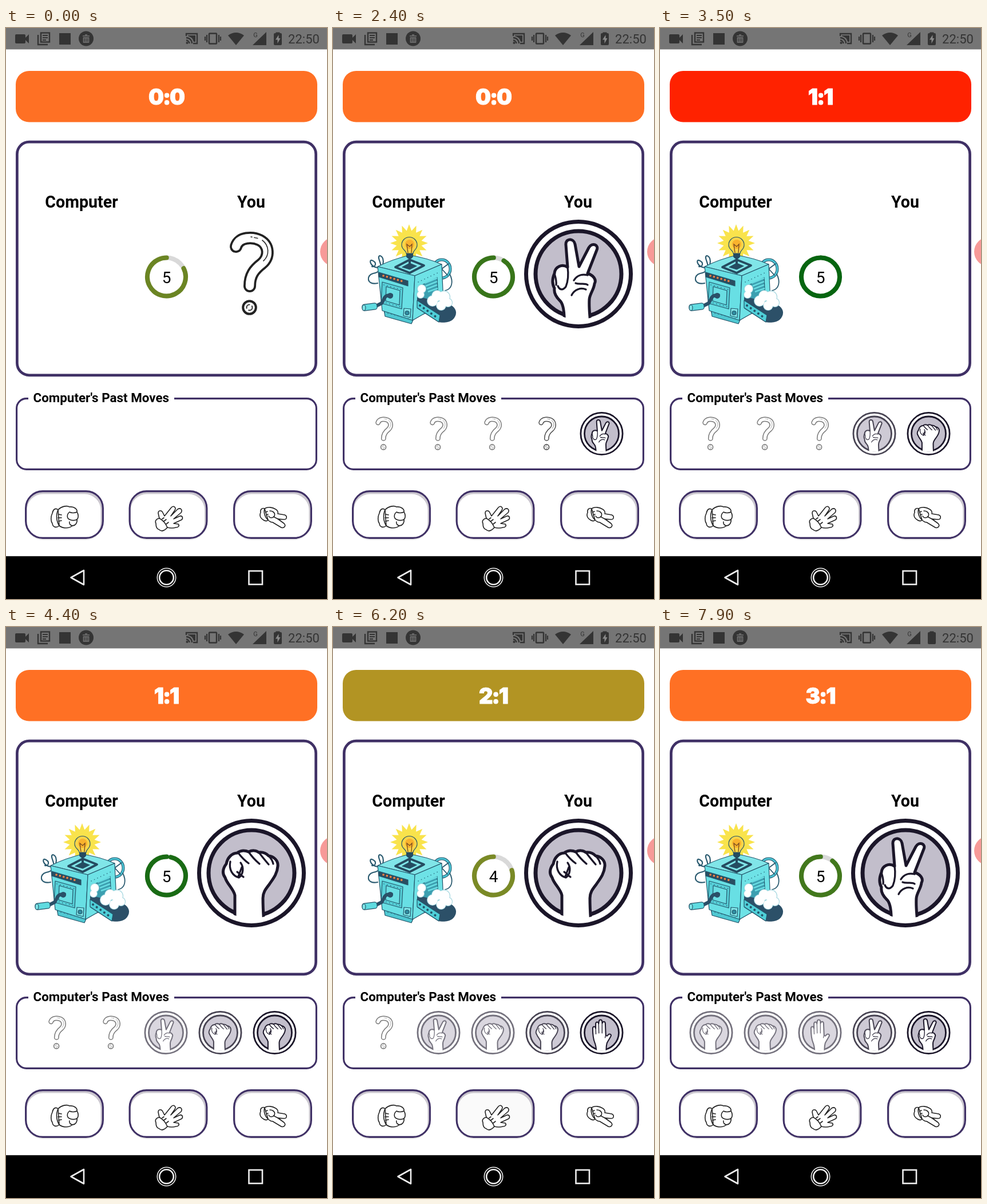
Animation of 561x998 px, one loop 8000 ms. Source, as an HTML page:

```html
<!DOCTYPE html>
<html lang="en">
<head>
<meta charset="utf-8">
<title>Hand game</title>
<style>
  html, body { margin: 0; width: 100%; height: 100%; overflow: hidden; background: #fff; }
  svg { display: block; width: 561px; height: 998px; }
  text { font-family: Roboto, Arial, sans-serif; text-anchor: middle; }
  .bold { font-weight: 700; }
  .line { fill: none; }
  #score {
    font: 900 38px Inter, sans-serif; letter-spacing: -2px; font-feature-settings: "calt" 0;
    fill: #fff; stroke: #fff; stroke-width: 1;
  }
  .glove { fill: #fff; stroke: #222; stroke-width: 1.6; stroke-linejoin: round; stroke-linecap: round; }
  .hand { fill: #fff; stroke: #1b1629; stroke-width: 5; stroke-linejoin: round; stroke-linecap: round; }
  .thin { fill: none; stroke-width: 3.3; }
  .ink { stroke: #24566b; stroke-width: 1.2; stroke-linejoin: round; }
</style>
</head>
<body>
<svg viewBox="0 0 561 998">
  <defs>
    <g id="medal">
      <circle r="91.5" fill="#fff" stroke="#1b1629" stroke-width="7"/>
      <circle r="75" fill="#c2becb" stroke="#1b1629" stroke-width="7"/>
    </g>
    <clipPath id="inner"><circle r="79.5"/></clipPath>

    <g id="q" transform="translate(-429 -430)" fill="none" stroke-linecap="round">
      <path id="hook" d="M402 382C407 364 432 365 444 371C460 380 461 400 447 412C434 422 426 432 426 451" stroke="#222" stroke-width="22"/>
      <path d="M402 382C407 364 432 365 444 371C460 380 461 400 447 412C434 422 426 432 426 451" stroke="#fff" stroke-width="14.5"/>
      <path d="M448 371C460 380 461 397 450 407" stroke="#333" stroke-width="1.7"/>
      <path d="M428 365L442 368" stroke="#333" stroke-width="1.7" stroke-dasharray="2 4 6 4"/>
      <circle cx="425.5" cy="488.5" r="11.3" fill="#fff" stroke="#222" stroke-width="4"/>
      <circle cx="425.5" cy="488.5" r="5" stroke="#333" stroke-width="2" stroke-dasharray="9 5"/>
    </g>

    <g id="s">
      <use href="#medal"/>
      <g clip-path="url(#inner)"><g class="hand" transform="translate(-429 -430)">
        <path d="M404 520C405 494 402 481 396 476C388 468 386 462 387 455C382 446 384 436 387 429C388 417 400 412 410 418L407 379C406 367 421 367 423 378L430 417L447 384C453 374 465 379 461 388L445 429C455 432 461 440 457 447C456 457 449 464 448 474C447 490 449 500 450 520"/>
        <path class="thin" d="M410 418C412 432 411 442 407 452C402 459 396 458 393 451M387 429C389 436 391 442 390 449M421 441C427 431 437 430 445 432M424 446C431 449 440 445 445 449M417 467C422 457 433 453 442 457"/>
      </g></g>
    </g>

    <g id="r">
      <use href="#medal"/>
      <g clip-path="url(#inner)"><g class="hand" transform="translate(-429 -430)">
        <path d="M400 520L400 469C398 458 386 449 383 438C377 430 379 422 385 414C387 403 395 395 404 395C410 390 418 390 424 393C430 390 437 390 442 394C450 393 456 397 459 400C468 401 476 408 475 418C474 432 466 441 460 450C453 459 449 464 449 474C449 494 450 504 451 520"/>
        <path class="thin" d="M392 410C389 424 396 435 407 438C415 432 416 420 410 412M404 428L415 437M412 420L406 436M406 395C412 403 417 408 424 413M424 393C430 402 436 408 443 414M442 394C448 402 453 408 459 415M459 400C464 405 466 409 467 414"/>
      </g></g>
    </g>

    <g id="p">
      <use href="#medal"/>
      <g clip-path="url(#inner)"><g class="hand" transform="translate(-429 -430)">
        <path d="M406 520C406 496 404 486 399 474C392 458 390 440 390 412C390 402 402 401 403 411L403 392C403 381 415 381 416 391L417 382C418 371 430 371 431 382L432 389C433 379 445 380 445 391L447 440C450 445 453 446 456 441C461 433 474 436 469 446C463 458 456 466 452 476C448 490 448 500 450 520"/>
        <path class="thin" d="M403 411L404 436M416 391L417 432M431 385L431 432M447 440L444 452"/>
      </g></g>
    </g>

    <g id="button">
      <rect x="1" y="4" width="136" height="83" rx="31" opacity=".09"/>
      <rect x="1" y="1" width="136" height="83" rx="30" fill="#cbc7cf"/>
      <rect x="3.5" y="6.5" width="129" height="78" rx="28" fill="#fff"/>
    </g>
    <rect id="edge" x="1.6" y="1.6" width="134.8" height="81.8" rx="29.600" fill="none" stroke="#3f3065" stroke-width="3.120"/>
  </defs>

  <rect width="561" height="998" fill="#fff"/>

  <!-- status bar -->
  <rect width="561" height="37.400" fill="#757575"/>
  <g fill="#343434" stroke="#343434" stroke-width="0">
    <path d="M18 11H32Q34 11 34 13V17L40 11V27L34 21V25Q34 27 32 27H18Q16 27 16 25V13Q16 11 18 11Z"/>
    <path d="M56 12V29H73" class="line" stroke-width="2.4"/>
    <rect x="61" y="8.5" width="15" height="16" class="line" stroke-width="2.4"/>
    <path d="M64 13H73M64 17H73M64 21H70" stroke-width="2"/>
    <rect x="93" y="9" width="20" height="20"/>
    <circle cx="140" cy="18.5" r="13"/>
    <path d="M134 14H146M138 12H142M135.5 17V25H144.5V17ZM138.5 17V25M141.5 17V25" class="line" style="stroke:#757575" stroke-width="1.6"/>
    <path d="M315 14V10H334V27H327M315 17A10 10 0 0 1 325 27M315 21.5A6 6 0 0 1 320.5 27" class="line" stroke-width="2.3"/>
    <path d="M318 13H331V24H328Q326 16 318 14Z"/>
    <circle cx="316.5" cy="26" r="2"/>
    <rect x="355" y="9.5" width="13" height="18" rx="1" class="line" stroke-width="2.5"/>
    <path d="M351 12V25M348 15V22M372 12V25M375 15V22" stroke-width="2.2"/>
    <path d="M388 13Q402 3 416 13L402 30Z"/>
    <path d="M455 7V30H431Z"/>
    <text x="436" y="16" font-size="11">G</text>
    <path d="M471.5 9V7.5H478.5V9H480Q482 9 482 11V28Q482 30 480 30H470Q468 30 468 28V11Q468 9 470 9Z"/>
    <path id="bolt" d="M476.5 12L471 20.5H474.5V27L479.5 18H476.5Z" fill="#8a8a8a"/>
    <text x="520.5" y="27" font-size="22">22:50</text>
  </g>

  <!-- score -->
  <rect id="banner" x="17" y="75" width="527" height="89.5" rx="23.4"/>
  <text id="score" x="280" y="134"></text>

  <!-- arena -->
  <rect x="19.4" y="199.2" width="522.2" height="407.6" rx="21" fill="none" stroke="#3f3065" stroke-width="4.7"/>
  <text class="bold" x="132" y="313.5" font-size="28.6">Computer</text>
  <text class="bold" x="428.5" y="313.5" font-size="28.6">You</text>

  <g id="machine">
    <path id="burst" fill="#f9e34c"/>
    <g fill="none" stroke="#2b5b70" stroke-width="2.2" stroke-linecap="round">
      <path d="M78 446C58 450 58 432 70 429C90 426 92 400 82 398C74 400 92 420 78 419C64 417 63 404 68 406C78 410 74 418 68 417"/>
      <ellipse cx="190" cy="421" rx="15" ry="16" stroke="#1e5468" stroke-width="5"/>
      <ellipse cx="190" cy="421" rx="15" ry="16" stroke="#4cc5d6" stroke-width="3"/>
      <path d="M178 430L202 412M181 411L200 432M204 430C211 444 208 456 196 459" stroke-width="1.8"/>
    </g>
    <g class="ink">
      <path d="M88 488L91 504L137 517L142 506L190 488V478Z" fill="#4fc8d2"/>
      <path d="M78 417Q104 404 134 397Q165 402 190 413L143 433Z" fill="#80e5e8"/>
      <path d="M78 417L143 433L139 511L86 494Z" fill="#68dfe4"/>
      <path d="M143 433L190 413L193 480L139 511Z" fill="#6ee2e6"/>
      <path d="M150 452L182 436L184 476L149 487Z" fill="#3c9fb0"/>
      <path d="M160 446L182 437M162 451L182 443M164 456L182 449M166 461L183 455" stroke="#68dce2" stroke-width="2.5"/>
      <path d="M109 418L134 405L159 415L134 428Z" fill="#80e5e8" stroke="#254b60" stroke-width="3.8"/>
      <path d="M121 418L134 411L146 416L134 422Z" fill="#254b60"/>
      <path d="M80 427L131 442V451L80 435Z" fill="#294d61"/>
      <path d="M86 444L122 454L120 491L84 481Z" fill="#57d0d8"/>
      <path d="M93 452L117 459L116 484L92 477Z" fill="#6adee3"/>
      <path d="M124 490L136 491L135 506L123 503Z" fill="#80e5e8"/>
      <circle cx="129.5" cy="498" r="3.5" fill="#2f8ca0"/>
    </g>
    <path d="M88 433L126 444" stroke="#f58242" stroke-width="3.6" stroke-linecap="round" stroke-dasharray=".1 6.5"/>
    <path d="M89 449L119 457M87 479L117 487M90 497L136 509M149 444L185 427" stroke="#2b6c80" stroke-width="1.6" stroke-linecap="round" stroke-dasharray=".1 6"/>
    <path d="M147 469L200 482C217 487 219 501 209 510C201 516 190 515 184 514L147 490Z" fill="#2c5068"/>
    <path class="ink" d="M147 476L187 502L185 514L147 489Z" fill="#4fcfd8"/>
    <path d="M152 485L183 507" stroke="#24566b" stroke-width="4" stroke-linecap="round" stroke-dasharray=".1 8"/>
    <g id="steam"></g>
    <path d="M102 467C88 466 90 475 85 481L75 486" fill="none" stroke="#2a5068" stroke-width="6" stroke-linecap="round"/>
    <circle cx="100" cy="468" r="5" fill="#2a5068"/>
    <rect class="ink" x="51" y="482" width="26" height="11" rx="4" fill="#5fdbe0" transform="rotate(-7 64 487)"/>
    <ellipse class="ink" cx="54" cy="489" rx="3" ry="5" fill="#80e5e8"/>
    <path d="M134 399V419" stroke="#254b60" stroke-width="4"/>
    <path class="ink" d="M128 394C128 388 120 388 120 379A13.5 13.5 0 0 1 147 379C147 388 140 388 140 394Z" fill="#fcd548"/>
    <circle cx="134" cy="378" r="8" fill="#f9b22d"/>
    <path d="M131 393L129 378L134 382L138 378L137 393" fill="none" stroke="#754821" stroke-width="1.3"/>
    <path d="M128 394H140V400L137 403H131L128 400Z" fill="#254b60"/>
  </g>

  <circle cx="280.5" cy="435" r="33.5" fill="none" stroke="#d9d9d9" stroke-width="8"/>
  <circle id="ring" cx="280.5" cy="435" r="33.5" fill="none" stroke-width="8" stroke-linecap="round"/>
  <text id="count" x="280.5" y="446" font-size="28"></text>
  <use id="pick" transform="translate(429 430)"/>
  <circle cx="574.5" cy="391" r="25.5" fill="#f79a98"/>

  <!-- history -->
  <rect x="18.6" y="647.6" width="523.8" height="123.800" rx="17" fill="none" stroke="#3f3065" stroke-width="3.120"/>
  <rect x="39" y="640" width="255" height="14" fill="#fff"/>
  <text class="bold" x="166.3" y="654" font-size="22.4">Computer's Past Moves</text>
  <g id="past"></g>

  <!-- buttons -->
  <g id="buttons"></g>
  <g class="glove">
    <path d="M91 842C97 836 106 834 111 837C119 836 125 841 124 846C127 850 127 856 124 859C125 865 121 870 116 870C110 875 100 875 93 870Z"/>
    <path d="M91 842C86 838 82 842 81 848C78 854 78 862 81 866C82 873 88 874 93 870C88 862 87 851 91 842Z"/>
    <path class="line" d="M124 846C120 848 114 848 111 846C106 850 106 857 111 859C115 861 120 861 124 859M116 870C112 869 110 866 111 863M92 850L97 851M91 856H97M92 862L97 861"/>
    <path d="M268 857L266 848C266 843 272 842 274 847L277 853L289 838C293 834 298 838 295 843L288 853L300 841C305 838 309 842 306 847L293 858L304 853C309 852 310 858 306 860L293 866L301 867C304 870 301 873 297 873C290 875 286 874 282 873Z"/>
    <path d="M268 857C262 858 260 862 262 866C262 872 264 876 268 877C272 881 278 878 282 873C279 866 274 860 268 857Z"/>
    <path class="line" d="M273 858L276 856M276 862L280 859M280 867L284 864"/>
    <path d="M452 840C458 836 466 838 471 841C475 843 476 847 475 849L487 851C492 853 491 859 486 859L475 858L486 866C490 870 486 875 481 873L466 864C462 864 460 862 458 860Z"/>
    <path d="M452 840C447 838 444 842 445 847C442 853 446 858 450 860C453 862 456 862 458 860C452 855 450 846 452 840Z"/>
    <path class="line" d="M461 844C467 844 471 848 469 853C466 857 461 857 459 853M475 858L469 855M454 846L457 845M455 851L458 850"/>
  </g>

  <!-- navigation -->
  <rect y="923.200" width="561" height="75" fill="#000"/>
  <g fill="none" stroke="#eee" stroke-width="2.600">
    <path d="M113.500 960.500L136 948V973Z" stroke-linejoin="round"/>
    <circle cx="280.500" cy="960.500" r="16.200" stroke-width="1.600"/>
    <circle cx="280.500" cy="960.500" r="12.300"/>
    <rect x="424.500" y="949" width="23.500" height="23.500"/>
  </g>
</svg>
<script>
const LOOP = 8000, TURN = 2 * Math.PI * 33.5;
const ORANGE = '#ff7024', OLIVE = '#b29423', RED = '#ff2200';
const $ = id => document.getElementById(id);

// each step: start time, then the state that holds from there
const scores = [[0, '0:0', ORANGE], [2600, '1:0', OLIVE], [3300, '1:1', RED], [4200, '1:1', ORANGE],
  [4700, '2:1', OLIVE], [6400, '3:1', OLIVE], [6600, '3:1', RED], [7350, '3:1', ORANGE]];
const picks = [[0, 'q'], [1500, ''], [2150, 's'], [3300, ''], [3650, 'r'],
  [6400, ''], [6650, 'p'], [7200, ''], [7400, 's']];
const rounds = [[0, 0], [1950, 1], [3300, 2], [4200, 3], [4750, 4], [6700, 5], [7600, 6]];
const moves = 'qqqqqsrrpss';
// time, seconds elapsed on the countdown
const clock = [[0, .88], [900, 1.78], [1400, 1.78], [1600, 1.9], [1930, 1.9], [1930, 0], [2400, .45],
  [2600, .6], [3300, 1.3], [3480, 1.3], [3480, 0], [4200, .7], [4200, 0], [4750, .5], [4750, 0],
  [5200, .45], [5750, 1.01], [6300, 1.01], [6620, 1.2], [6620, 0], [7360, .7], [7360, 0], [8000, .63]];
// button, press, end of fade
const presses = [[2, 850, 1400], [0, 2850, 3300], [0, 4400, 4750], [1, 5800, 6270], [2, 6950, 7350]];

const at = (steps, t) => steps.filter(s => s[0] <= t).pop();
const clamp = x => Math.max(0, Math.min(1, x));

function elapsed(t) {
  let i = 1;
  while (i < clock.length - 1 && clock[i][0] <= t) i++;
  const [t0, a] = clock[i - 1], [t1, b] = clock[i];
  return a + (b - a) * (t - t0) / (t1 - t0);
}

$('burst').setAttribute('d', 'M' + Array.from({ length: 32 }, (_, i) => {
  const a = i * Math.PI / 16, r = i % 2 ? 22 : 33;
  return (133 + r * Math.sin(a)).toFixed(1) + ' ' + (376 - r * Math.cos(a)).toFixed(1);
}).join('L') + 'Z');

const puffs = [[155, 456, 7], [153, 466, 6], [174, 477, 9], [182, 468, 9], [194, 470, 10], [201, 480, 7], [189, 485, 8]];
const puff = (grow, fill) => puffs.map(([x, y, r]) => `<circle cx="${x}" cy="${y}" r="${r + grow}" fill="${fill}"/>`).join('');
$('steam').innerHTML = puff(1, '#9cd3dc') + puff(0, '#fff');

$('past').innerHTML = [.6, .6, .6, .8, 1].map((o, i) =>
  `<use transform="translate(${89.5 + 95 * i} 709) scale(.4)" opacity="${o}"/>`).join('');
const slots = [...$('past').children];

$('buttons').innerHTML = [33, 214.5, 397].map(x => `<g transform="translate(${x} 808)">
  <use href="#button"/><rect class="press" x="2" y="2" width="134" height="81" rx="28"/><use href="#edge"/></g>`).join('');
const shades = [...document.querySelectorAll('.press')];

function draw(now) {
  const t = now % LOOP;
  const [, score, color] = at(scores, t);
  $('score').textContent = score;
  $('banner').setAttribute('fill', color);

  const e = elapsed(t), p = e / 5;
  const ring = $('ring');
  ring.setAttribute('stroke', `rgb(${4 + 583 * p},${100 + 190 * p},${16 + 110 * p})`);
  ring.setAttribute('stroke-dasharray', `${TURN * (1 - p)} ${TURN}`);
  ring.setAttribute('transform', `rotate(${360 * p - 90} 280.5 435)`);
  $('count').textContent = Math.ceil(5 - e);

  $('machine').setAttribute('opacity', clamp((t - 100) / 300));
  $('pick').setAttribute('href', '#' + at(picks, t)[1]);

  const n = at(rounds, t)[1];
  slots.forEach((s, i) => s.setAttribute('href', n ? '#' + moves[n + i] : '#'));

  shades.forEach((s, i) => {
    const k = presses.filter(b => b[0] === i)
      .map(([, a, b]) => Math.min(clamp((t - a) / 150), clamp((b - t) / 210)));
    s.setAttribute('opacity', .06 * Math.max(...k));
  });

  const full = t > 200 && (t + 400) % 1000 < 600;
  $('bolt').setAttribute('opacity', full ? 0 : 1);
}

let start;
function tick(now) {
  start ??= now;
  draw(now - start);
  requestAnimationFrame(tick);
}
draw(0);
requestAnimationFrame(tick);
</script>
</body>
</html>
```
